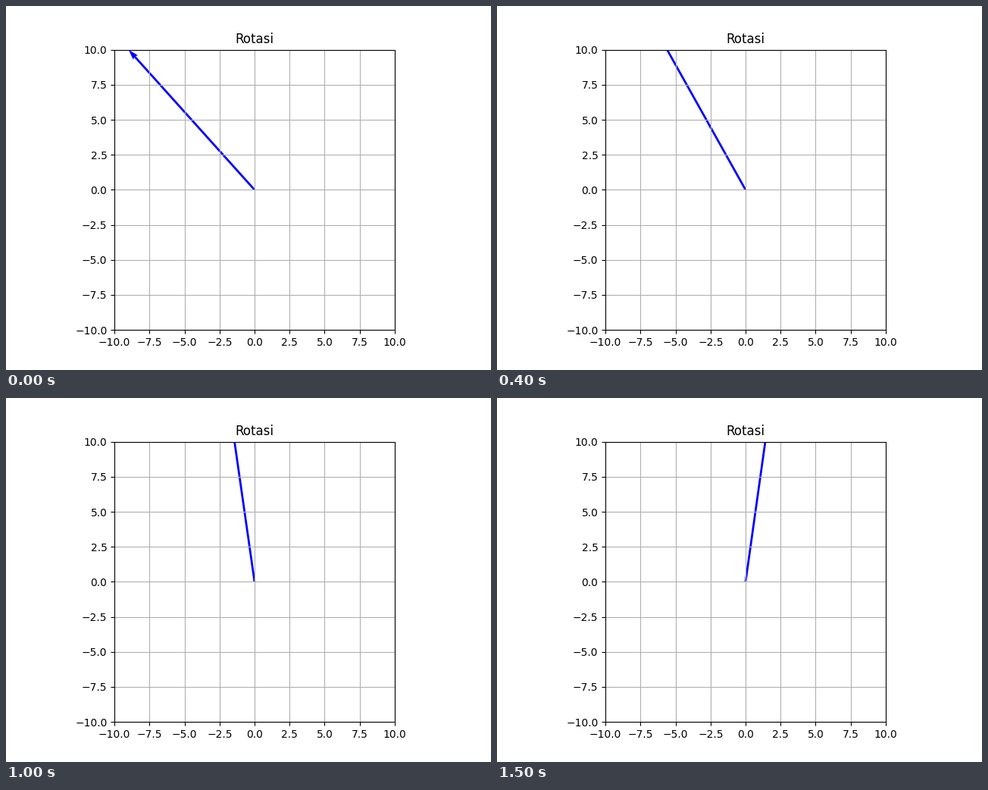
A matplotlib script that plays this animation: 640x480 px, repeating every 1.55 s.

```python
import numpy as np
import matplotlib.pyplot as plt
from matplotlib.animation import FuncAnimation

STEPS = 30
INTERVAL = 50
LIMIT = 10

# The tip slides in a straight line from the vector to its rotated copy.
angle = np.radians(-50)
rotation = np.array([[np.cos(angle), -np.sin(angle)],
                     [np.sin(angle), np.cos(angle)]])
start = np.array([-9.0, 10.0])
end = rotation @ start

fig, ax = plt.subplots(figsize=(6.4, 4.8), dpi=100)
ax.set_xlim(-LIMIT, LIMIT)
ax.set_ylim(-LIMIT, LIMIT)
ax.set_aspect("equal")
ax.grid(True)
ax.set_title("Rotasi")

arrow = ax.quiver(0, 0, *start, angles="xy", scale_units="xy", scale=1,
                  color="blue")


def update(i):
    u, v = start + (end - start) * i / STEPS
    arrow.set_UVC(u, v)
    return (arrow,)


anim = FuncAnimation(fig, update, frames=STEPS + 1, interval=INTERVAL,
                     repeat=True, repeat_delay=0)
plt.show()
```
